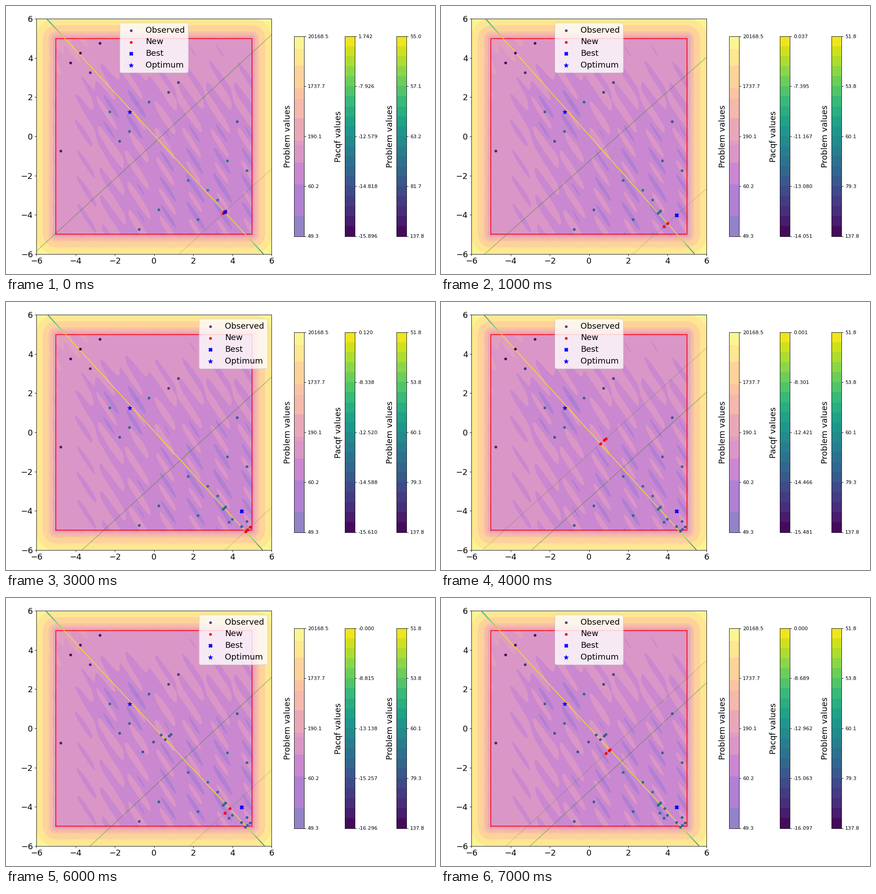
Write a matplotlib script that moves like this. It is 947 px wide and 592 px high and loops after 8 s.

```python
import numpy as np
import matplotlib.pyplot as plt
from matplotlib.animation import FuncAnimation
from matplotlib.collections import LineCollection

W, H, DPI = 947, 592, 80
LEFT, RIGHT, TOP, BOTTOM = 67.0, 586.2, 28.4, 547.7
SCALE = (RIGHT - LEFT) / 12
BIG, SMALL = 16.2, 10
F_OPT, LOW, HIGH, WORST = 48.6, 49.3, 20168.5, 137.8

plt.rcParams["font.family"] = "DejaVu Sans"
viridis, plasma = plt.colormaps["viridis"], plt.colormaps["plasma"]


def log_values(low, high, fractions):
    """Values at fractions of a log1p scale running from low to high."""
    return low - 1 + (high - low + 1) ** np.asarray(fractions)


def log_fraction(value, low, high):
    return np.log1p(np.clip(value - low, 0, high - low)) / np.log1p(high - low)


def bowl(x, y):
    """Double bowl of the Lunacek function."""
    mu, s = 2.5, 1 - 1 / (2 * np.sqrt(22) - 8.2)
    mu2 = -np.sqrt((mu**2 - 1) / s)
    u, v = -2 * x, 2 * y
    return np.minimum((u - mu)**2 + (v - mu)**2,
                      2 + s * ((u - mu2)**2 + (v - mu2)**2))


def waves(x, y):
    """Rastrigin waves on a lattice of slanted valleys."""
    across, down = np.array([1.41, 0]), np.array([.058, -1.45])
    # Screen y grows downwards, so the lattice steps to lower y
    basis = np.column_stack([2 * down + across, down + across])
    (a, b), (c, d) = np.linalg.inv(basis)
    dx, dy = x + .91, y - 1.73
    return 10 * (2 - np.cos(2 * np.pi * (a * dx + b * dy))
                 - np.cos(2 * np.pi * (c * dx + d * dy)))


def penalty(x, y):
    return 1e4 * sum(np.maximum(np.abs(t) - 5, 0)**2 for t in (x, y))


def point_colors(points, low):
    """Low values are bright; the waves count with a typical height."""
    value = F_OPT + bowl(points[:, 0], points[:, 1]) + 17
    return viridis(1 - log_fraction(value, low, WORST))


# Latin hypercube: one start point in each row and column
ROWS = [8, 17, 18, 16, 19, 12, 9, 10, 0, 13, 2, 14, 15, 5, 1, 4, 3, 7, 11, 6]
START = np.column_stack([np.arange(20), ROWS]) * .5 - 4.75

# Axis tilt, probe x on the axis, offsets along the probe line, Pacqf range
STEPS = [
    (1.086, 3.61, (0, -.08, .05), (-15.896, 1.742)),
    (1.126, 4.00, (0, -.17, .48), (-14.051, .037)),
    (1.090, 4.47, (0, .28), (-15.740, .653)),
    (1.095, 4.67, (0, .10, .24), (-15.610, .120)),
    (1.107, .58, (0, .20, .29), (-15.481, .001)),
    (1.090, .37, (0, -.39, -.94), (-15.900, 0)),
    (1.075, 3.87, (0, -.25), (-16.2964, -.0004)),
    (1.080, 1.07, (0, -.04, -.20), (-16.0968, 0)),
]
PIVOT = .06


def axis_y(x, tilt):
    return -tilt * (x - PIVOT)


def batch(i):
    tilt, x, offsets, _ = STEPS[i]
    step = np.array(offsets)
    return np.column_stack([x + step, axis_y(x, tilt) + step / tilt])


BATCHES = [batch(i) for i in range(len(STEPS))]

fig = plt.figure(figsize=(W / DPI, H / DPI), dpi=DPI, facecolor="white")


def px_axes(x0, y0, x1, y1):
    return fig.add_axes([x0 / W, 1 - y1 / H, (x1 - x0) / W, (y1 - y0) / H])


ax = px_axes(LEFT, TOP, RIGHT, BOTTOM)
ax.set(xlim=(-6, 6), ylim=(-6, 6))
ax.set_xticks(range(-6, 7, 2))
ax.set_yticks(range(-6, 7, 2))
ax.tick_params(labelsize=BIG)

bands = np.array([0, .1, .259, .368, .456, .479,
                  .59, .687, .739, .853, .937, 1])
mids = (bands[1:] + bands[:-1]) / 2
pale = (plasma(mids)[:, :3] + 1) / 2
grid = np.linspace(-6, 6, 601)
gx, gy = np.meshgrid(grid, grid)
height = F_OPT + bowl(gx, gy) + waves(gx, gy) + penalty(gx, gy)
ax.contourf(gx, gy, log_fraction(height, LOW, HIGH), levels=bands, colors=pale)
ax.plot([-5, 5, 5, -5, -5], [-5, -5, 5, 5, -5], color="red", lw=1.5, zorder=2)


def colorbar(x0, label, edges, colors):
    bar = px_axes(x0, 67, x0 + 22, 508.5)
    for lo, hi, color in zip(edges[:-1], edges[1:], colors):
        bar.axhspan(lo, hi, color=color, lw=0)
    bar.set(xlim=(0, 1), ylim=(0, 1), xticks=[])
    bar.yaxis.tick_right()
    bar.set_yticks(quarters)
    bar.tick_params(labelsize=SMALL)
    fig.text((x0 - 14) / W, 1 - 288 / H, label, rotation=90, fontsize=BIG,
             ha="center", va="center")
    return bar


quarters = np.linspace(0, 1, 5)
even = np.linspace(0, 1, 21)
even_colors = viridis((even[1:] + even[:-1]) / 2)
problem_bar = colorbar(636, "Problem values", bands, pale)
acq_bar = colorbar(748, "Pacqf values", even, even_colors)
found_bar = colorbar(862, "Problem values", even, even_colors)


def label_bar(bar, values, digits):
    bar.set_yticklabels([f"{v:.{digits}f}" for v in values])


label_bar(problem_bar, log_values(LOW, HIGH, quarters), 1)

axis_line = LineCollection([], linewidths=1.5, zorder=3)
ax.add_collection(axis_line)
center_line, = ax.plot([], [], color="green", alpha=.5, lw=1, zorder=2.5)
probe_line, = ax.plot([], [], color="green", alpha=.25, lw=1, zorder=2.5)

DOT = dict(s=20, lw=1)
X_MARK = dict(s=50, lw=1, marker="X", color="blue")
STAR = dict(s=75, lw=1, marker="*", color="blue")
observed = ax.scatter([], [], zorder=4, **DOT)
new = ax.scatter([], [], color="red", zorder=5, s=22, lw=1.2)
best = ax.scatter([], [], zorder=6, **X_MARK)
ax.scatter([-1.25], [1.25], zorder=6, **STAR)
handles = [
    ax.scatter([], [], color=viridis(.23), **DOT),
    ax.scatter([], [], color="red", **DOT),
    ax.scatter([], [], **X_MARK),
    ax.scatter([], [], **STAR),
]
NAMES = ["Observed", "New", "Best", "Optimum"]


def draw_axis(tilt):
    y = np.linspace(6, -6, 241)
    pts = np.column_stack([PIVOT - y / tilt, y])
    axis_line.set_segments(np.stack([pts[:-1], pts[1:]], axis=1))
    out = np.maximum(np.abs(pts).max(axis=1)[:-1] - 5, 0)
    shade = np.where(y[:-1] > 0, .97 - .53 * out, .97 - .7 * out**1.5)
    axis_line.set_color(viridis(shade))


def draw_cross(line, x, tilt):
    """Line at right angles to the axis; returns its y under the legend."""
    ends = np.array([-6, 6, 5.8])
    y = axis_y(x, tilt) + (ends - x) / tilt
    line.set_data(ends[:2], y[:2])
    return y[2]


def update(i):
    tilt, probe_x, _, acq_range = STEPS[i]
    low = 51.78 if i else 55.04
    seen = np.vstack([START, *BATCHES[:i]])

    draw_axis(tilt)
    center_x = seen[:, 0].mean() + .2
    reach = max(draw_cross(center_line, center_x, tilt),
                draw_cross(probe_line, probe_x, tilt))

    observed.set_offsets(seen)
    observed.set_color(point_colors(seen, low))
    new.set_offsets(BATCHES[i])
    best.set_offsets([BATCHES[1][2] if i else BATCHES[0][0]])

    label_bar(acq_bar, log_values(*acq_range, quarters), 3)
    label_bar(found_bar, log_values(low, WORST, quarters[::-1]), 1)

    # The legend keeps clear of the cross lines
    ax.legend(handles, NAMES, fontsize=BIG, labelspacing=.43,
              loc="upper right" if reach < 3.25 else "upper center"
              ).set_zorder(8)
    return []


anim = FuncAnimation(fig, update, frames=len(STEPS), interval=1000,
                     repeat=True, repeat_delay=0, blit=False,
                     init_func=lambda: update(0))
plt.show()
```
